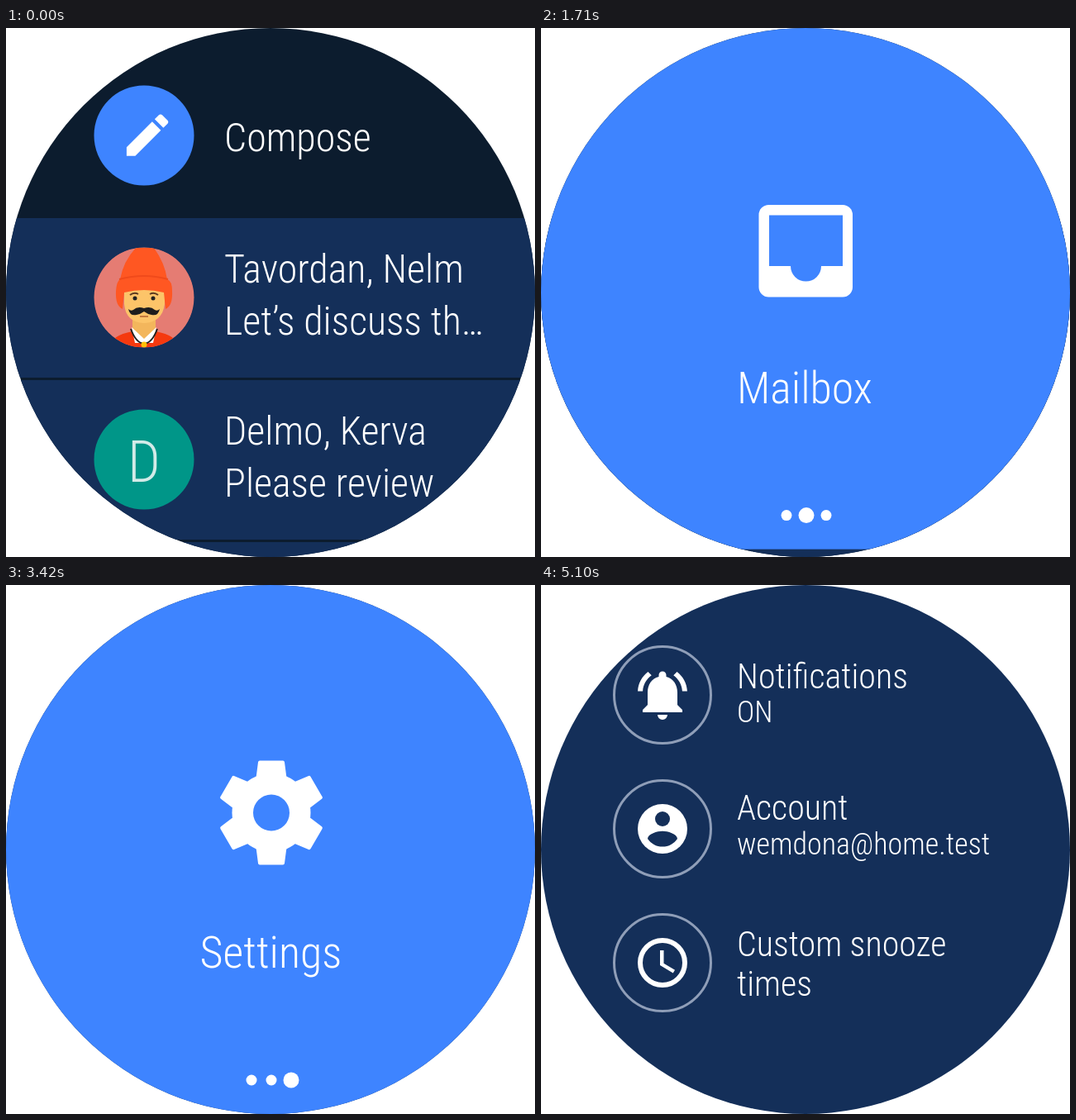
An HTML page for the animation above (7230 ms loop, 640 by 640 pixels).

```html
<!DOCTYPE html>
<html lang="en">
<head>
<meta charset="utf-8">
<title>Watch mail drawer</title>
<style>
  html, body { margin: 0; width: 100%; height: 100%; overflow: hidden; background: #fff; }
  svg { display: block; width: 100vw; height: 100vh; }
  text {
    font-family: "Roboto Condensed", Roboto, sans-serif;
    font-weight: 300; font-stretch: 75%; font-size: 48px; fill: #fff;
  }
  .title { font-size: 54px; text-anchor: middle; }
  .option { font-size: 42px; }
  .detail { font-size: 36px; }
  .initial { font-size: 70px; text-anchor: middle; fill: #d3ebe8; }
  .navy { fill: #142f59; }
  .night { fill: #0c1c2e; }
  .blue { fill: #3e84ff; }
  .white { fill: #fff; }
  .ring { fill: none; stroke: #8f9eb8; stroke-width: 3; }
</style>
</head>
<body>
<svg viewBox="0 0 640 640">
  <defs>
    <clipPath id="watch"><circle cx="320" cy="320" r="320"/></clipPath>
    <clipPath id="portrait"><circle r="60.5"/></clipPath>
    <path id="tooth" d="M-14-61H14L17-38H-17Z" fill="#fff" stroke="#fff" stroke-width="4" stroke-linejoin="round"/>
  </defs>

  <g clip-path="url(#watch)">
    <g id="inbox">
      <rect class="night" width="640" height="640"/>
      <path class="navy" d="M0 230H640V423H0ZM0 426H640V619H0ZM0 622H640V640H0Z"/>

      <circle class="blue" cx="167" cy="130" r="60.5"/>
      <path class="white" transform="translate(137.5 96) scale(2.8)" d="M3 17.25V21h3.75L17.81 9.94l-3.75-3.75zM20.71 7.04c.39-.39.39-1.02 0-1.41l-2.34-2.34c-.39-.39-1.02-.39-1.41 0l-1.83 1.83 3.75 3.75z"/>
      <text x="264" y="149">Compose</text>

      <g transform="translate(167 326)">
        <g clip-path="url(#portrait)">
          <circle r="61" fill="#e57c73"/>
          <path d="M-42 60Q-40 46-14 41H14Q40 46 42 60Z" fill="#f5390f"/>
          <path d="M-14 24H14V42L0 54-14 42Z" fill="#f3b65c"/>
          <path d="M-15 36L0 50 15 36 11 55H-11Z" fill="#fff"/>
          <path d="M-16 38Q-10 55 0 56Q10 55 16 38" fill="none" stroke="#222" stroke-width="2"/>
          <circle cy="57" r="3.5" fill="#ffc107"/>
          <path d="M-24-14H25V8Q22 30 0 31Q-22 30-24 8Z" fill="#fcc469"/>
          <path d="M-10-60H12Q25-42 28-22Q34-20 34-8Q35 10 26 14L24-6Q0-12-24-6L-26 14Q-35 10-34-8Q-33-20-29-22Q-25-44-10-60Z" fill="#ff5722"/>
          <path d="M-30-22Q0-30 29-22" fill="none" stroke="#f04a1b" stroke-width="2"/>
          <path d="M-17-3Q-12-7-7-4M7-4Q12-7 17-3" fill="none" stroke="#5b3a20" stroke-width="2"/>
          <circle cx="-11" cy="1" r="2.5" fill="#222"/>
          <circle cx="11" cy="1" r="2.5" fill="#222"/>
          <path d="M0 13Q8 10 13 15Q16 17 19 14Q17 23 9 21Q4 20 0 17Q-4 20-9 21Q-17 23-19 14Q-16 17-13 15Q-8 10 0 13Z" fill="#1d1d1d"/>
          <path d="M-5 23H5" stroke="#c67a3c" stroke-width="2"/>
        </g>
      </g>
      <text x="264" y="308">Tavordan, Nelm</text>
      <text x="264" y="371">Let’s discuss th…</text>

      <circle cx="167" cy="522" r="60.5" fill="#009688"/>
      <text class="initial" x="167" y="549">D</text>
      <text x="264" y="504">Delmo, Kerva</text>
      <text x="264" y="567">Please review</text>
    </g>

    <g id="options">
      <rect class="navy" width="640" height="640"/>
      <circle class="ring" cx="147" cy="133" r="58.5"/>
      <path class="white" transform="translate(111 97) scale(3)" d="M7.58 4.08L6.15 2.65C3.75 4.48 2.17 7.3 2.03 10.5h2c.15-2.65 1.51-4.97 3.55-6.42zm12.39 6.42h2c-.15-3.2-1.73-6.02-4.12-7.85l-1.42 1.43c2.02 1.45 3.39 3.77 3.54 6.42zM18 11c0-3.07-1.64-5.64-4.5-6.32V4a1.5 1.5 0 0 0-3 0v.68C7.63 5.36 6 7.92 6 11v5l-2 2v1h16v-1l-2-2zM10 20a2 2 0 0 0 4 0z"/>
      <text class="option" x="237" y="125">Notifications</text>
      <text class="detail" x="237" y="166">ON</text>

      <circle class="ring" cx="147" cy="295" r="58.5"/>
      <circle class="white" cx="147" cy="295" r="30"/>
      <circle class="navy" cx="147" cy="283" r="9"/>
      <path class="navy" transform="translate(111 259) scale(3)" d="M6 15.98c.03-1.99 4-3.08 6-3.08s5.97 1.09 6 3.08c-1.29 1.94-3.5 3.22-6 3.22s-4.71-1.28-6-3.22z"/>
      <text class="option" x="237" y="284">Account</text>
      <text class="detail" x="237" y="326">wemdona@home.test</text>

      <circle class="ring" cx="147" cy="457" r="58.5"/>
      <circle cx="147" cy="457" r="27" fill="none" stroke="#fff" stroke-width="6"/>
      <path class="white" transform="translate(111 421) scale(3)" d="M12.5 7H11v6l5.25 3.15.75-1.23-4.5-2.67z"/>
      <text class="option" x="237" y="449">Custom snooze</text>
      <text class="option" x="237" y="497">times</text>
    </g>

    <g id="drawer">
      <rect class="blue" width="640" height="640"/>
      <g id="mailbox">
        <rect class="white" x="263.5" y="223.5" width="113.5" height="111.5" rx="12"/>
        <path class="blue" d="M276 236H365V297.5H339A18.5 18.5 0 0 1 302 297.5H276Z"/>
        <text class="title" x="319" y="463">Mailbox</text>
      </g>
      <g id="settings">
        <g id="gear" transform="translate(321 275.5)"><circle class="white" r="47.5"/></g>
        <circle class="blue" cx="321" cy="275.5" r="22"/>
        <text class="title" x="320.5" y="463">Settings</text>
      </g>
      <circle class="white" cx="297" cy="599" r="6.5"/>
      <circle class="white" id="middleDot" cx="321" cy="599"/>
      <circle class="white" id="rightDot" cx="345" cy="599"/>
    </g>
    <circle id="touch" fill="#f00"/>
  </g>
</svg>
<script>
const LOOP = 7230, STEP = 30, SIZE = 640;
const el = id => document.getElementById(id);
const clamp = v => Math.min(1, Math.max(0, v));
const span = (t, from, to) => clamp((t - from) / (to - from));

// Quick start with a long settling tail.
const fling = u => (1 - (1 - u) ** 5.5) ** 3;
const easeInOut = u => u < .5 ? (2 * u) ** 2.5 / 2 : 1 - (2 - 2 * u) ** 2.5 / 2;

const move = (id, x, y) => el(id).setAttribute("transform", `translate(${x} ${y})`);
const show = (id, on) => el(id).setAttribute("display", on ? "inline" : "none");

for (let angle = 0; angle < 360; angle += 60) {
  const tooth = document.createElementNS("http://www.w3.org/2000/svg", "use");
  tooth.setAttribute("href", "#tooth");
  tooth.setAttribute("transform", `rotate(${angle})`);
  el("gear").append(tooth);
}

function drawTouch(t, pull, swipe, push) {
  const gestures = [
    { start: 1020, release: 1440, x: 321, y: 50 + SIZE * pull },
    { start: 2370, release: 2810, x: 585 - SIZE * swipe, y: 324 },
    { start: 4320, release: 4800, x: 323, y: 582 - SIZE * push }
  ];
  const active = gestures.find(g => t >= g.start && t < g.release + 200);
  show("touch", active);
  if (!active) return;
  const { start, release, x, y } = active;
  const strength = span(t, start - STEP, start + 90) * (1 - span(t, release, release + 200));
  const touch = el("touch");
  touch.setAttribute("cx", x);
  touch.setAttribute("cy", y);
  touch.setAttribute("r", 50 * strength);
  touch.setAttribute("fill-opacity", .53 * strength);
}

function draw(t) {
  const pull = fling(span(t, 1075, 2100));
  const swipe = fling(span(t, 2520, 3420));
  const push = easeInOut(span(t, 4440, 5040));

  show("inbox", t < 3420);
  show("options", t >= 3420);
  move("drawer", 0, SIZE * (pull - 1 - push));
  move("mailbox", -SIZE * swipe, 0);
  move("settings", SIZE * (1 - swipe), 0);
  el("middleDot").setAttribute("r", 9.5 - 3 * swipe);
  el("rightDot").setAttribute("r", 6.5 + 3 * swipe);
  drawTouch(t, pull, swipe, push);
}

const begin = performance.now();
function tick() {
  const t = (performance.now() - begin) % LOOP;
  draw(Math.floor(t / STEP) * STEP);
  requestAnimationFrame(tick);
}
tick();
</script>
</body>
</html>
```
